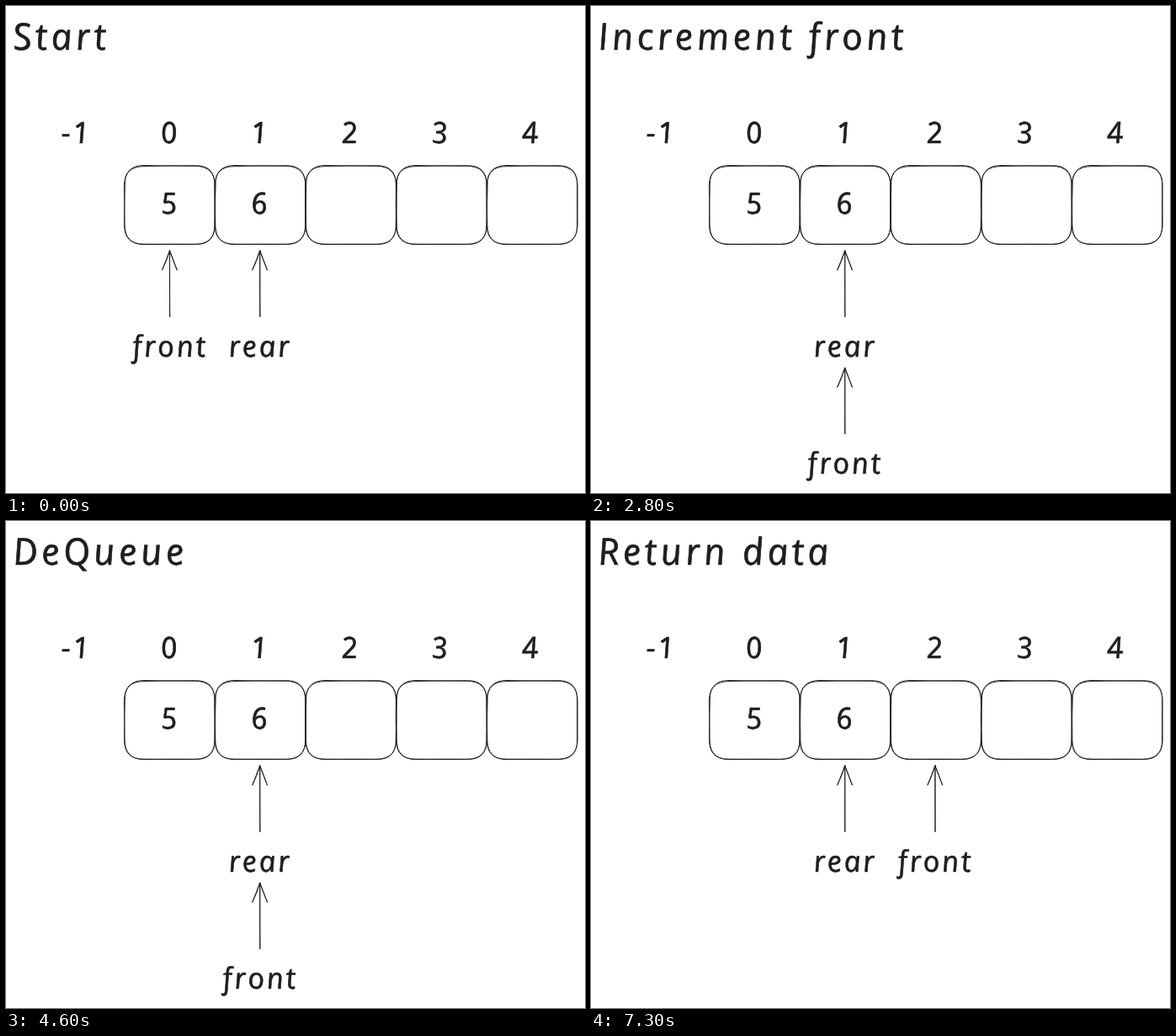
These frames come from a looping animation (688 px wide and 579 px high, 8.2 s). An HTML page:

```html
<!DOCTYPE html>
<html lang="en">
<head>
<meta charset="utf-8">
<title>Queue removal</title>
<style>
  html, body { margin: 0; width: 100%; height: 100%; overflow: hidden; background: #fff; }
  svg { display: block; width: 688px; height: 579px; }
  path { fill: none; stroke: #1e1e1e; stroke-width: .95; stroke-linecap: round; stroke-linejoin: round; }
  text {
    font: italic 35px "Open Sans", "Noto Sans", sans-serif; letter-spacing: .08em; text-anchor: middle;
    fill: #1e1e1e; stroke: #1e1e1e; stroke-width: .6; stroke-linejoin: round;
  }
  #title { font-size: 44px; letter-spacing: .1em; text-anchor: start; }
</style>
</head>
<body>
<svg viewBox="0 0 688 579"></svg>
<script>
const svg = document.querySelector('svg');
const LEFT = 140.8, STEP = 107.7, TOP = 190, HEIGHT = 93.3, LOOP = 8200;
const center = slot => 194.4 + 107.2 * slot;

function add(parent, tag, attrs, text = '') {
  const node = document.createElementNS('http://www.w3.org/2000/svg', tag);
  for (const key in attrs) node.setAttribute(key, attrs[key]);
  node.textContent = text;
  return parent.appendChild(node);
}

// The skew sets the cursive italic letterforms almost upright.
function write(parent, x, y, text, attrs = {}) {
  return add(parent, 'text', { transform: `translate(${x} ${y}) skewX(8)`, ...attrs }, text);
}

// Two loose passes of a rounded box give the sketched outline.
function sketchBox(x) {
  const r = 23, w = STEP - 0.4, h = HEIGHT;
  for (const d of [-0.5, 0.6]) {
    add(svg, 'path', {
      transform: `translate(${x} ${TOP})`,
      d: `M${r + d} ${d}Q${w / 2} ${-d} ${w - r - d} ${d / 2}
          Q${w + d} ${d} ${w} ${r + 2 * d}Q${w - d} ${h / 2} ${w + d / 2} ${h - r}
          Q${w - d} ${h + d} ${w - r + d} ${h}Q${w / 2} ${h - d} ${r - d} ${h + d / 2}
          Q${d} ${h - d} ${d / 2} ${h - r + d}Q${-d} ${h / 2} ${d} ${r - d}
          Q${-d} ${d} ${r + d} ${d}`
    });
  }
}

function pointer(name) {
  const group = add(svg, 'g');
  add(group, 'path', {
    d: `M0 369.5Q.5 330 0 291M.4 369Q-.3 330 .2 291
        M0 291Q-4 302 -9 314M.2 291Q-3.5 303 -8.5 313.5
        M0 291Q4 302 9 314M.2 291Q5 303 8.5 313.5`
  });
  write(group, 2, 417, name);
  return group;
}

function place(group, slot, drop = 0) {
  group.setAttribute('transform', `translate(${center(slot)} ${drop})`);
}

for (let i = 0; i < 5; i++) {
  sketchBox(LEFT + STEP * i);
  write(svg, center(i) + 2, 163, i);
}
write(svg, 85, 163, '-1');
['5', '6'].forEach((value, i) => write(svg, center(i) + 2, 247, value));

const title = write(svg, 10, 52, '', { id: 'title' });
const front = pointer('front');
place(pointer('rear'), 1);

const steps = ['DeQueue', 'Save front in data', 'Increment front', 'Return data'];

function draw(now) {
  const t = now % LOOP;
  const step = Math.floor((t - 1000) / 900);
  title.textContent = step < 0 ? 'Start' : steps[step % 4];
  const moves = step < 2 ? 0 : step < 6 ? 1 : 2;
  place(front, moves, moves === 1 ? 139.3 : 0);
}

let start;
function tick(now) {
  start ??= now;
  draw(now - start);
  requestAnimationFrame(tick);
}
draw(0);
requestAnimationFrame(tick);
</script>
</body>
</html>
```
